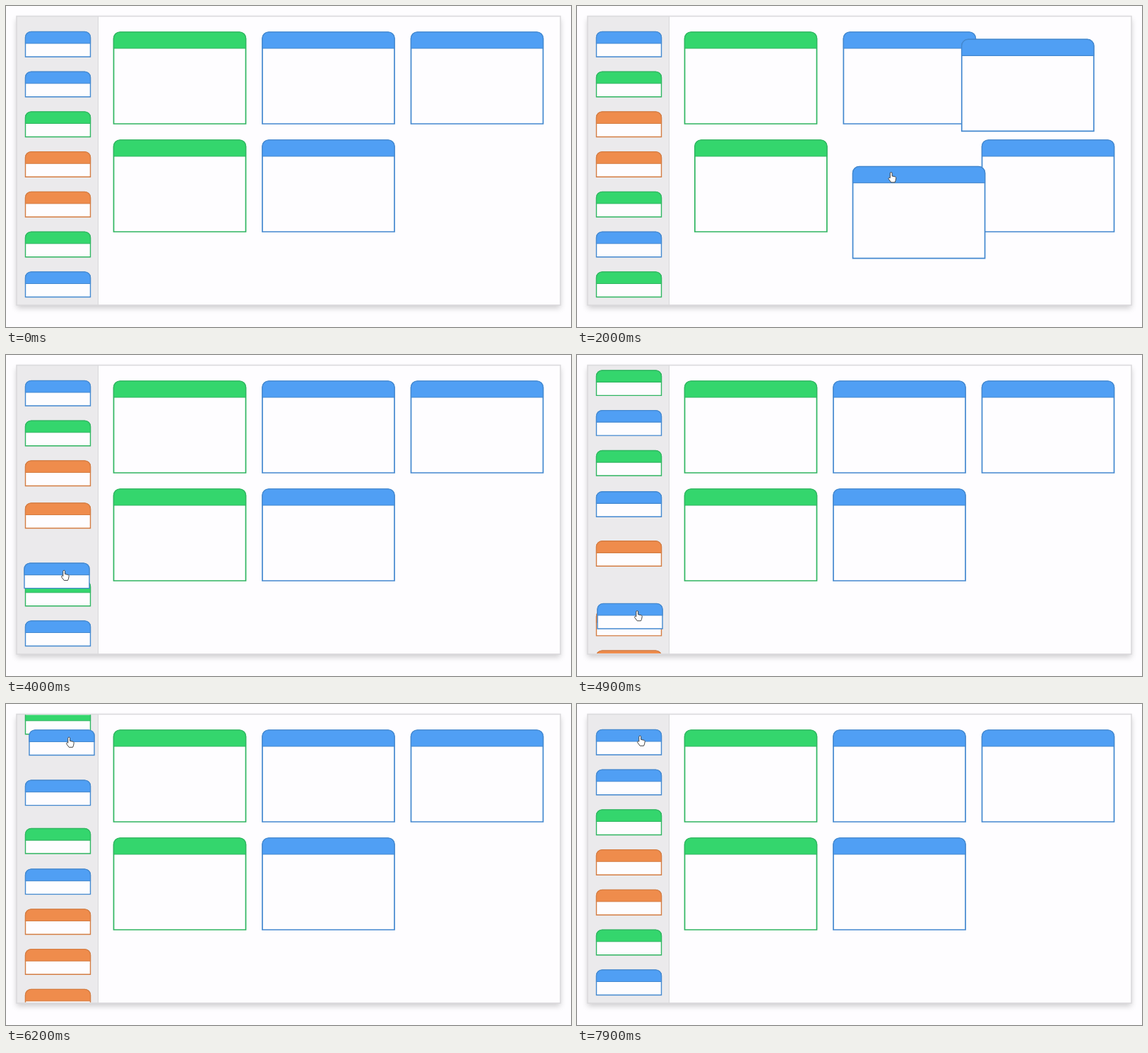
Animation, 800 px wide and 455 px high, one loop 9300 ms. Source, as an HTML page with a canvas:

```html
<!DOCTYPE html>
<html>
<head>
<meta charset="utf-8">
<style>
  html, body { margin: 0; overflow: hidden; background: #fefdff; }
  canvas { display: block; }
</style>
</head>
<body>
<canvas id="stage" width="800" height="455"></canvas>
<script>
const ctx = document.getElementById('stage').getContext('2d');
const LOOP = 9300, START = 500, GRAB = 1000, ENTER = 3200, TURN = 5300, DROP = 7600;
const PITCH = 56.75, TOP = 36;

// fill, outline
const COLORS = {
  B: ['#509ff4', '#4388cf'],
  G: ['#34d66d', '#2fb560'],
  O: ['#ef8c4c', '#d37c42']
};
const BIG = { w: 187, h: 130, head: 23, r: 9, line: 1.7, dx: 56, dy: 15 };
const SMALL = { w: 92, h: 35.5, head: 16.5, r: 8, line: 1.4, dx: 58, dy: 17 };
const board = [...'GBBGB'], list = [...'BGOOGBGBOOO'];

// time, x, y of the pointer
const PATH = [
  [500, 262, 150], [800, 208, 51.5], [1000, 208, 51.5], [1300, 344, 90],
  [1550, 450, 120], [1850, 470, 225], [2150, 400, 250], [2500, 230, 225],
  [2900, 120, 186], [3250, 96, 200], [3600, 90, 230], [4000, 84, 312],
  [4350, 80, 362], [4900, 87, 369.5], [5400, 89, 370], [5750, 92, 200],
  [6100, 91, 56], [6200, 91, 54], [7500, 91, 52], [9300, 91, 52]
];
// time, free slot on the board
const GAPS = [[0, 0], [1400, 1], [1850, 4], [2400, 3], [ENTER, 9]];

const clamp = (v, a, b) => Math.min(b, Math.max(a, v));

function slope(i, c) {
  if (i < 1 || i > PATH.length - 2) return 0;
  const [p, q, r] = PATH.slice(i - 1, i + 2);
  const a = (q[c] - p[c]) / (q[0] - p[0]), b = (r[c] - q[c]) / (r[0] - q[0]);
  return a * b <= 0 ? 0 : 2 * a * b / (a + b);
}

// monotone cubic through PATH
function track(t, c) {
  let i = 0;
  while (i < PATH.length - 2 && t >= PATH[i + 1][0]) i++;
  const p = PATH[i], q = PATH[i + 1], d = q[0] - p[0], u = clamp((t - p[0]) / d, 0, 1), v = 1 - u;
  return v * v * (1 + 2 * u) * p[c] + u * u * (3 - 2 * u) * q[c]
    + u * v * d * (v * slope(i, c) - u * slope(i + 1, c));
}

const scroll = t => t < 5500 ? clamp((t - 4370) * .455, 0, 294) : clamp(294 - (t - 6118) * .455, 0, 294);

const boardGap = t => GAPS.filter(g => t >= g[0]).pop()[1];

function listGap(t) {
  if (t < ENTER) return 99;
  t -= 60;
  const y = track(t, 2) + scroll(t) - TOP;
  return clamp(t < TURN ? Math.floor(y / PITCH) : Math.ceil((y - SMALL.h) / PITCH), 0, list.length);
}

// recent values, the newest counting most: cards settle exponentially
function settle(samples, f) {
  let sum = 0, total = 0, w = 1;
  for (const s of samples) {
    sum += w * f(s);
    total += w;
    w *= .8465;
  }
  return sum / total;
}

const history = (f, t) => Array.from({ length: 40 }, (_, k) => f(t - k * 10));
const slotX = n => 152.5 + n % 3 * 210.5;
const slotY = n => 37 + Math.floor(n / 3) * 153;

function card(x, y, kind, s) {
  const [fill, edge] = COLORS[kind];
  ctx.beginPath();
  ctx.roundRect(x, y, s.w, s.h, [s.r, s.r, 0, 0]);
  ctx.fillStyle = '#fefdff';
  ctx.fill();
  ctx.lineWidth = s.line;
  ctx.strokeStyle = edge;
  ctx.stroke();
  ctx.beginPath();
  ctx.roundRect(x, y, s.w, s.head, [s.r, s.r, 0, 0]);
  ctx.fillStyle = fill;
  ctx.fill();
  ctx.lineWidth = 1.2;
  ctx.stroke();
}

function panel() {
  ctx.fillStyle = '#fefdff';
  ctx.fillRect(0, 0, 800, 455);
  ctx.save();
  ctx.shadowColor = 'rgba(0,0,0,.2)';
  ctx.shadowBlur = 8;
  ctx.shadowOffsetY = 4;
  ctx.fillRect(15, 15, 770, 409);
  ctx.restore();
  ctx.fillStyle = '#ebeaec';
  ctx.fillRect(15, 15, 115, 409);
  ctx.fillStyle = '#d8d8da';
  ctx.fillRect(130, 15, 1, 409);
  ctx.lineWidth = 1.6;
  ctx.strokeStyle = '#dbdadd';
  ctx.strokeRect(15, 14.5, 770, 409.5);
}

const hand = new Path2D('M-3.2 1V-5.5a1.4 1.4 0 0 1 2.8 0V-1.6l4.2.9c1 .3 1.5 1 1.4 2l-.7 3.6-1 2.4H-1.8L-5.3 2.6c-.8-1.2.6-2.3 2.1-1.4z');

function pointer(x, y) {
  ctx.save();
  ctx.translate(x, y);
  ctx.fillStyle = '#fff';
  ctx.fill(hand);
  ctx.lineWidth = 1;
  ctx.strokeStyle = '#444';
  ctx.stroke(hand);
  ctx.restore();
}

function dragged(t, x, y) {
  const s = t < ENTER ? BIG : SMALL;
  if (t < GRAB) return card(slotX(0), slotY(0), 'B', s);
  const k = 1 - (1 - clamp((t - DROP) / 250, 0, 1)) ** 3;
  x -= s.dx;
  y -= s.dy;
  card(x + (27.5 - x) * k, y + (TOP + .5 - y) * k, 'B', s);
}

function draw(now) {
  const clock = now % LOOP, idle = clock < START;
  const t = idle ? LOOP - 1 : clock;
  const x = track(t, 1), y = track(t, 2);
  panel();

  const gaps = history(boardGap, t);
  board.forEach((kind, i) => {
    const slot = g => i + (g <= i);
    card(settle(gaps, g => slotX(slot(g))), settle(gaps, g => slotY(slot(g))), kind, BIG);
  });

  const holes = history(listGap, t);
  ctx.save();
  ctx.beginPath();
  ctx.rect(16, 15.5, 114, 407.5);
  ctx.clip();
  list.forEach((kind, i) => {
    const shift = settle(holes, g => +(g <= i));
    card(27.5, TOP + .5 + (i + shift) * PITCH - scroll(t), kind, SMALL);
  });
  ctx.restore();

  dragged(t, x, y);
  if (!idle) pointer(x, y);
}

const t0 = performance.now();
function frame() {
  draw(performance.now() - t0);
  requestAnimationFrame(frame);
}
frame();
</script>
</body>
</html>
```
